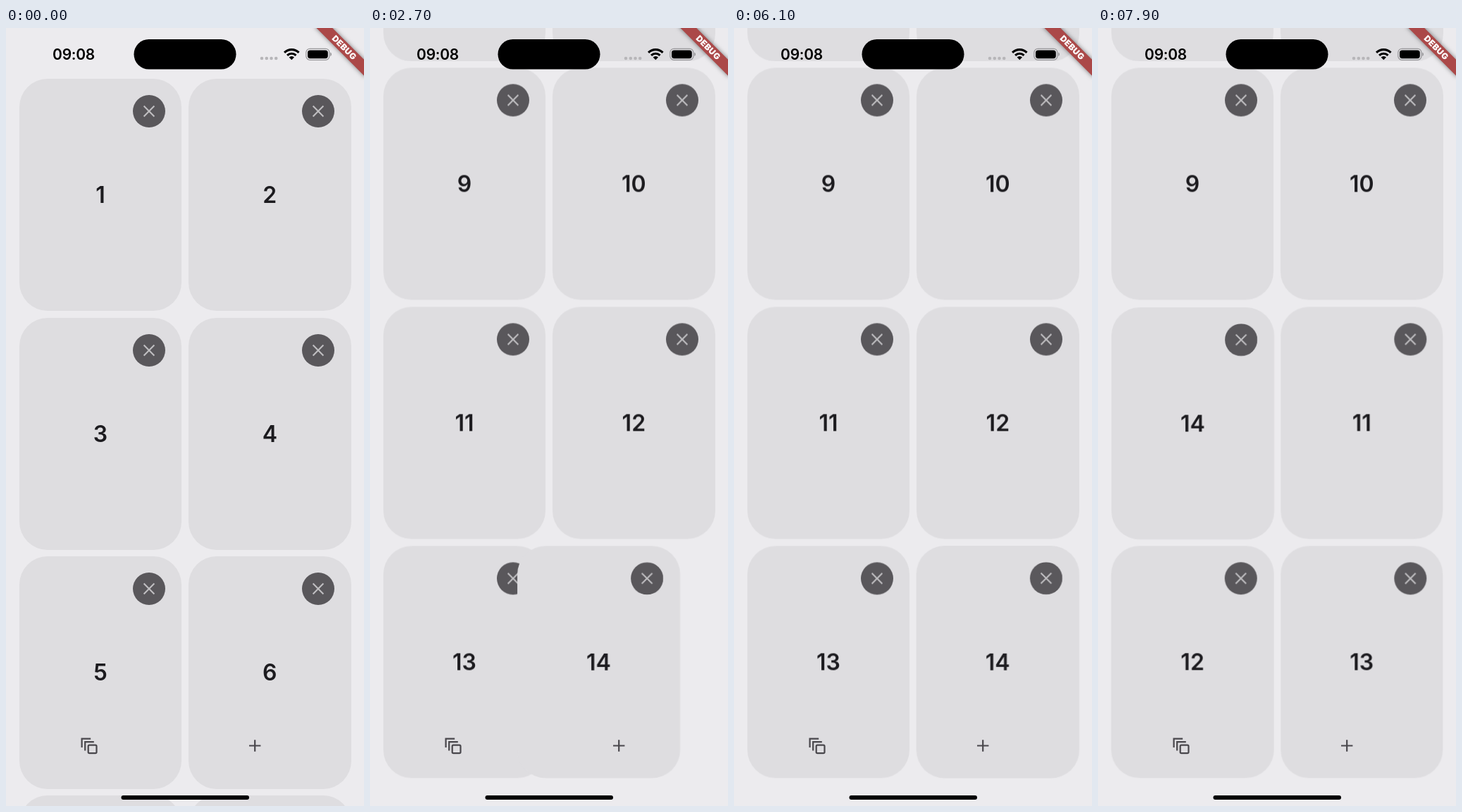
Write an HTML page that moves like this. It is 508 px wide and 1103 px high and loops after 8000 ms.

```html
<!DOCTYPE html>
<html lang="en">
<head>
<meta charset="utf-8">
<title>Card grid</title>
<style>
  :root { --dx: 240.3px; --dy: 338.9px; --ink: #1c1b1f; }
  html, body { margin: 0; width: 100%; height: 100%; overflow: hidden; background: #ecebee; }
  body { position: relative; font-family: Inter, Roboto, sans-serif; }

  #list { position: absolute; left: 18.7px; top: 71.7px; animation: scroll 8s linear infinite; }
  .card {
    position: absolute;
    width: 230.7px; height: 329.2px;
    border-radius: 40px;
    background: #dedde0;
    color: var(--ink);
    font-size: 32px; font-weight: 600; line-height: 330px; text-align: center;
  }
  .card svg { position: absolute; left: 161.3px; top: 23px; }

  #card11 { animation: toRight 8s linear infinite; }
  #card12 { animation: toNextRow 8s linear infinite; }
  #card13 { animation: toRightEarly 8s linear infinite; }
  #card14 { animation: drag 8s linear infinite; }

  @keyframes scroll {
    0% { transform: none; }
    5% { transform: none; animation-timing-function: cubic-bezier(.45, .05, .5, 1); }
    13.75% { transform: translateY(-1387px); animation-timing-function: ease-out; }
    20%, 100% { transform: translateY(-1370.6px); }
  }
  @keyframes toRight {
    0% { transform: none; }
    85.9% { transform: none; animation-timing-function: ease-in-out; }
    89.6%, 100% { transform: translateX(var(--dx)); }
  }
  @keyframes toRightEarly {
    0% { transform: none; }
    85.5% { transform: none; animation-timing-function: ease-in-out; }
    89.25%, 100% { transform: translateX(var(--dx)); }
  }
  @keyframes toNextRow {
    0% { transform: none; }
    85.9% { transform: none; animation-timing-function: ease-in-out; }
    89.6%, 100% { transform: translate(calc(-1 * var(--dx)), var(--dy)); }
  }
  @keyframes drag {
    0% { transform: translate(0, 0) scale(1); opacity: 1; }
    /* slide over the neighbour, wait, slide back */
    32.5% { transform: translate(0, 0) scale(1); animation-timing-function: ease-in-out; }
    36.5% { transform: translate(-240.3px, 0) scale(1); }
    48.3% { transform: translate(-240.3px, 0) scale(1); animation-timing-function: ease-in-out; }
    54.8% { transform: translate(0, 0) scale(1); }
    /* lift, carry, drop */
    76.2% { transform: translate(0, 0) scale(1); opacity: 1; }
    78.5% { transform: translate(-6px, -3px) scale(1.05); opacity: .7; animation-timing-function: ease-in; }
    82.5% { transform: translate(-110px, -40px) scale(1.05); }
    85.5% { transform: translate(-180px, -150px) scale(1.05); }
    88.75% { transform: translate(-200.3px, -262.5px) scale(1.05); animation-timing-function: ease-out; }
    93.75% { transform: translate(-232px, -326px) scale(1.05); opacity: .7; animation-timing-function: ease-out; }
    98.6%, 100% { transform: translate(-239.9px, -338.3px) scale(1); opacity: 1; }
  }

  #chrome { position: absolute; left: 0; top: 0; }
  #clock {
    position: absolute; left: 46px; top: 25px; width: 100px;
    font-size: 21px; font-weight: 600; line-height: 26px; letter-spacing: -.3px;
    text-align: center; color: #000;
  }
  #banner {
    position: absolute; left: 430.3px; top: 20px; width: 100px; height: 15.5px;
    transform: rotate(45deg);
    background: #ab4848;
    box-shadow: 0 0 6px rgba(0, 0, 0, .5);
    color: #fff;
    font-size: 12px; font-weight: 900; line-height: 15.5px; letter-spacing: .3px;
    text-align: center;
  }
</style>
</head>
<body>
<div id="list"></div>

<svg id="chrome" width="508" height="1103" viewBox="0 0 508 1103" fill="none">
  <rect x="181.5" y="16" width="145" height="42.5" rx="21.2" fill="#000"/>
  <path d="M363 43h.01M369.8 43h.01M376.5 43h.01M383.2 43h.01" stroke="#b7b6b9" stroke-width="4.6" stroke-linecap="round"/>
  <g stroke="#000" stroke-width="3.2">
    <path d="M395.1 34.8a14.4 14.4 0 0 1 20.4 0"/>
    <path d="M399.1 38.8a8.8 8.8 0 0 1 12.4 0"/>
  </g>
  <path d="M405.3 45.2l-3.7-3.8a5.3 5.3 0 0 1 7.4 0z" fill="#000"/>
  <rect x="425.9" y="29.3" width="33" height="16" rx="5.4" stroke="#98979a" stroke-width="1.3"/>
  <rect x="428" y="31.4" width="28.8" height="11.8" rx="3.6" fill="#000"/>
  <path d="M460.2 34.6q1.8 .8 1.8 2.7t-1.8 2.7z" fill="#98979a"/>

  <g stroke="#49474c" stroke-width="2.2">
    <path d="M107.6 1020v-12.4h12.6M112.2 1024.4v-12.2h12.6"/>
    <rect x="116.7" y="1016.6" width="11.8" height="11.6" rx="1.6"/>
    <path d="M345 1017.5h16.4M353.2 1009.3v16.4"/>
  </g>
  <rect x="163.5" y="1088" width="181.5" height="6" rx="3" fill="#000"/>
</svg>
<div id="clock">09:08</div>
<div id="banner">DEBUG</div>

<script>
  const closeIcon = `<svg width="46" height="46" viewBox="-23 -23 46 46">
    <circle r="23" fill="#59575b"/>
    <path d="M-7.4-7.4 7.4 7.4M7.4-7.4-7.4 7.4" stroke="#bfbec1" stroke-width="2.1"/></svg>`;
  const list = document.getElementById('list');

  for (let i = 0; i < 14; i++) {
    const card = document.createElement('div');
    card.className = 'card';
    card.id = 'card' + (i + 1);
    card.style.left = `calc(${i % 2} * var(--dx))`;
    card.style.top = `calc(${Math.floor(i / 2)} * var(--dy))`;
    card.innerHTML = closeIcon + (i + 1);
    list.append(card);
  }
</script>
</body>
</html>
```
